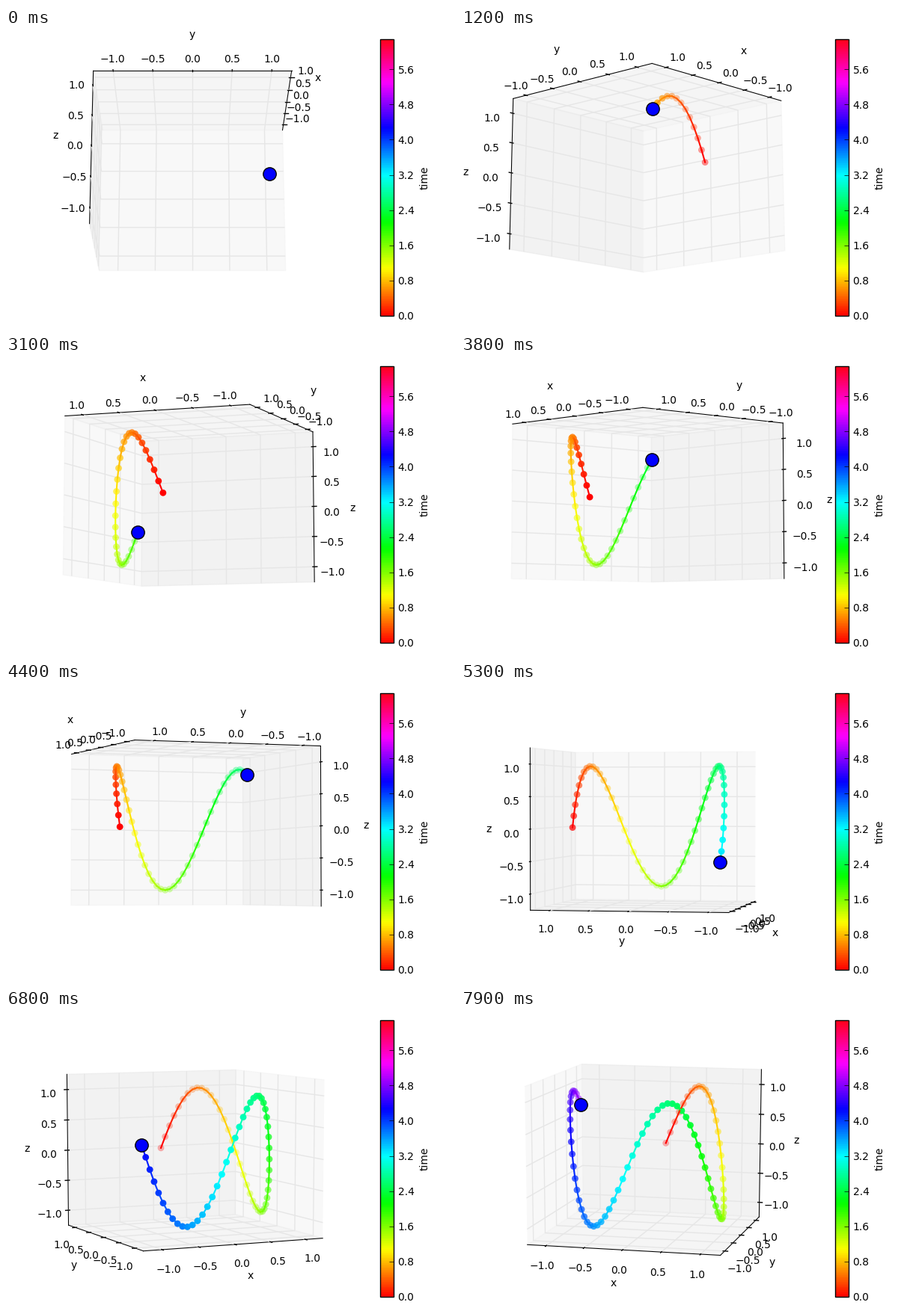
Write a matplotlib script that moves like this. It is 600 px wide and 400 px high and loops after 8 s.

```python
import numpy as np
import matplotlib.pyplot as plt
from matplotlib.animation import FuncAnimation
from matplotlib.cm import ScalarMappable
from matplotlib.collections import LineCollection
from matplotlib.colors import Normalize
from matplotlib.patches import Polygon

plt.rcParams.update({"font.family": "DejaVu Sans", "font.size": 10})

FRAMES, STEPS = 80, 100
LIMIT = 1.2                  # data range is -LIMIT..LIMIT on every axis
EDGE = 1.25                  # the drawn box is slightly larger
DELTA = 2 * LIMIT / 12
DIST = 10                    # camera distance in box lengths
LABEL_PAD, TITLE_PAD = 0.193, 0.419
TICKS = np.array([-1, -0.5, 0, 0.5, 1])
PANE_GREY = (0.95, 0.90, 0.925)
SIDE = (1, 0, 0)             # direction in which each axis' ticks point

t = np.linspace(0, 2 * np.pi, STEPS + 1)
path = np.column_stack([np.sin(t), np.cos(t), np.sin(3 * t)])
hues = plt.get_cmap("hsv")(t / (2 * np.pi))

fig = plt.figure(figsize=(6, 4), dpi=100, facecolor="white")
ax = fig.add_axes([15 / 600, 15 / 400, 456 / 600, 370 / 400])
ax.set(xlim=(-0.095, 0.09), ylim=(-0.095, 0.09))
ax.axis("off")

# Time scale
cax = fig.add_axes([499.5 / 600, 15 / 400, 18.5 / 600, 370 / 400])
bar = fig.colorbar(ScalarMappable(Normalize(0, 2 * np.pi), "hsv"), cax=cax,
                   ticks=np.arange(0, 6, 0.8), format="%.1f")
bar.outline.set_linewidth(1)
bar.ax.tick_params(direction="in", length=4, width=0.5, pad=4)
bar.set_label("time", labelpad=5)


def camera(azim, elev):
    """Rows: right, up and towards the viewer."""
    ca, sa = np.cos(azim), np.sin(azim)
    ce, se = np.cos(elev), np.sin(elev)
    return np.array([[-sa, ca, 0], [-ca * se, -sa * se, ce], [ca * ce, sa * ce, se]])


def project(view, points):
    right, up, near = view @ (np.atleast_2d(points) / (2 * LIMIT)).T
    depth = DIST - near
    return np.column_stack([right, up]) / depth[:, None], depth


def push_out(points, axis, pad):
    """Move points away from the box centre, except along the axis."""
    shift = np.sign(points) * pad
    shift[..., axis] = 0
    return points + shift


def along(point, axis, values):
    """Copies of a point with one coordinate replaced by each value."""
    out = np.tile(point, (len(values), 1))
    out[:, axis] = values
    return out


def lines(**style):
    coll = LineCollection([], zorder=2, clip_on=False, **style)
    ax.add_collection(coll, autolim=False)
    return coll


def tick_text(value):
    return f"{value:.1f}".replace("-", "\u2212")


class BoxAxis:
    def __init__(self, index, name):
        self.i = index
        self.line, = ax.plot([], [], "k-", lw=0.75, zorder=2, clip_on=False)
        self.title = ax.text(0, 0, name, ha="center", va="center", zorder=2)
        self.grid = lines(colors=[(0.9, 0.9, 0.9)], linewidths=1)
        self.ticks = lines(colors="k", linewidths=1, capstyle="projecting")
        self.labels = [ax.text(0, 0, tick_text(v), ha="center", va="top", zorder=2)
                       for v in TICKS]

    def update(self, view, far):
        i, side = self.i, SIDE[self.i]
        start = far.copy()
        start[side] *= -1
        end = start.copy()
        end[i] *= -1
        self.line.set_data(*project(view, [start, end])[0].T)

        middle = push_out((start + end) / 2, i, TITLE_PAD)
        self.title.set_position(project(view, middle)[0][0])

        corner = along(far, i, TICKS)
        arms = [corner.copy(), corner, corner.copy()]
        arms[0][:, (i + 1) % 3] *= -1
        arms[2][:, (i + 2) % 3] *= -1
        self.grid.set_segments(np.stack([project(view, p)[0] for p in arms], axis=1))

        base = along(start, i, TICKS)
        step = np.zeros(3)
        step[side] = np.sign(far[side]) * DELTA
        ends = [project(view, base + k * step)[0] for k in (0.1, -0.2)]
        self.ticks.set_segments(np.stack(ends, axis=1))

        spots = project(view, push_out(base, i, LABEL_PAD))[0]
        for label, spot in zip(self.labels, spots):
            label.set_position(spot)


def pane_corners(axis, far):
    a, b = [k for k in range(3) if k != axis]
    out = np.tile(far, (4, 1))
    out[:, a] = np.array([-1, 1, 1, -1]) * EDGE
    out[:, b] = np.array([-1, -1, 1, 1]) * EDGE
    return out


panes = [ax.add_patch(Polygon(np.zeros((4, 2)), closed=False, color=(g, g, g, 0.5),
                              lw=1, zorder=1, clip_on=False)) for g in PANE_GREY]
axes = [BoxAxis(i, name) for i, name in enumerate("xyz")]
dots = ax.scatter([], [], s=40, edgecolors="none", zorder=3, clip_on=False)
trail = LineCollection([], linewidths=1.5, capstyle="projecting", zorder=4, clip_on=False)
ax.add_collection(trail, autolim=False)
ball, = ax.plot([], [], "o", ms=12.5, mfc="b", mec="k", mew=1, zorder=5, clip_on=False)


def update(n):
    turn = n / STEPS
    view = camera(2 * np.pi * turn, np.radians(40 * turn - 20))
    far = np.where(view[2] < -1e-9, EDGE, -EDGE)

    for i, pane in enumerate(panes):
        pane.set_xy(project(view, pane_corners(i, far))[0])
    for axis in axes:
        axis.update(view, far)

    xy, depth = project(view, path[:n + 1])
    z = -DIST / depth
    colors = hues[:n + 1].copy()
    colors[:, 3] = 1 - 0.7 * (z - z.min()) / max(np.ptp(z), 1e-9)
    dots.set_offsets(xy)
    dots.set_facecolors(colors)
    trail.set_segments(np.stack([xy[:-1], xy[1:]], axis=1))
    trail.set_color(hues[:n])
    ball.set_data(xy[-1:, 0], xy[-1:, 1])
    return []


anim = FuncAnimation(fig, update, frames=FRAMES, init_func=lambda: update(0),
                     interval=100, repeat=True, repeat_delay=0, blit=False)
plt.show()
```
